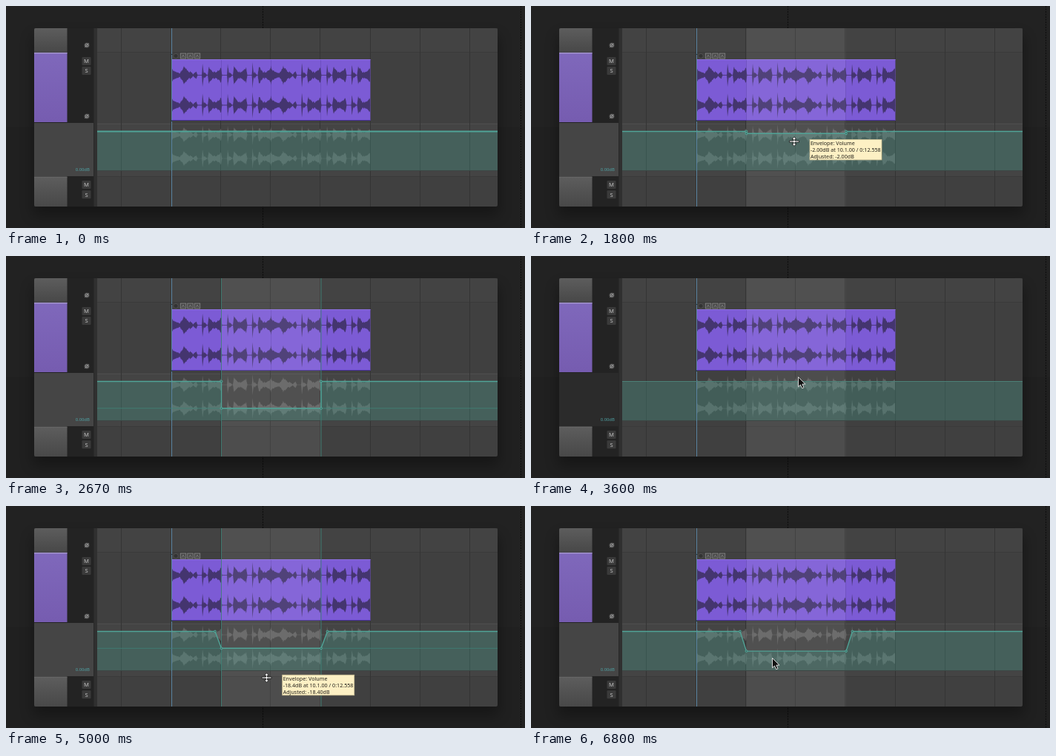
Animation of 700x300 px, one loop 6870 ms. Source, as an HTML page:

```html
<!DOCTYPE html>
<html lang="en">
<head>
<meta charset="utf-8">
<title>Volume envelope</title>
<style>
html, body { margin: 0; width: 100%; height: 100%; overflow: hidden; background: #212121; }
svg { display: block; width: 700px; height: 300px; }
text { font-family: "Noto Sans", "Open Sans", sans-serif; }
</style>
</head>
<body>
<svg viewBox="0 0 700 300" xmlns="http://www.w3.org/2000/svg">
  <defs>
    <linearGradient id="grey" x2="0" y2="1"><stop stop-color="#5d5d5d"/><stop offset="1" stop-color="#484848"/></linearGradient>
    <linearGradient id="violet" x2="0" y2="1"><stop stop-color="#7f68bb"/><stop offset="1" stop-color="#765cb0"/></linearGradient>
    <clipPath id="window"><rect x="38" y="30" width="625" height="241" rx="2"/></clipPath>
    <clipPath id="lane"><rect x="123" y="161" width="540" height="61"/></clipPath>
    <filter id="blur" x="-20%" y="-30%" width="140%" height="160%"><feGaussianBlur stdDeviation="9"/></filter>
  </defs>

  <rect width="700" height="300" fill="#202020"/>
  <rect width="700" height="163.5" fill="#222"/>
  <path d="M346.5 0V300M694.5 0V300" stroke="#0c0c0c" stroke-dasharray="2 1.5"/>
  <rect x="36" y="40" width="629" height="243" fill="#000" opacity=".3" filter="url(#blur)"/>

  <g clip-path="url(#window)">
    <rect x="38" y="30" width="625" height="241" fill="#404040"/>
    <rect x="123" y="30" width="540" height="32" fill="#434343"/>
    <g id="laneGlow">
      <rect x="123" y="158" width="540" height="72" fill="#fff" opacity=".02"/>
      <path d="M123 159.5H663" stroke="#4d4d4d"/>
    </g>
    <path d="M123 62.5H663M123 230.5H663" stroke="#3a3a3a"/>
    <path id="grid" stroke="#343434"/>

    <g id="item">
      <rect x="223" y="72" width="268.5" height="83" fill="#7c5bd5"/>
      <path d="M223 72.5H491.5" stroke="#8d70df"/>
      <path d="M223 154.5H491.5" stroke="#48309a"/>
      <path d="M290.5 73V154M357.5 73V154M424.5 73V154" stroke="#6448b5" opacity=".6"/>
      <path d="M223 93.5H491.5M223 134H491.5" stroke="#4b397f" stroke-width=".8"/>
      <path id="wave" fill="#44356f"/>
    </g>
    <g id="icons" fill="#4a4a4a" stroke="#888" stroke-width=".8">
      <circle cx="229" cy="67.5" r="3.2" fill="#333" stroke="#555"/>
    </g>
    <rect id="selection" x="290.5" y="30" height="241" fill="#fff" opacity=".065"/>

    <g clip-path="url(#lane)">
      <path id="ghost" fill="#fff" opacity=".16"/>
      <path id="fill" fill="#48a08f" opacity=".3"/>
    </g>
    <path d="M123 222.5H663" stroke="#3c4644"/>
    <path d="M223.5 30V271" stroke="#5d86a3"/>
    <path d="M222 64l3 2h-3zM222 156v-3l3 3z" fill="#27343c"/>

    <g id="guides" stroke="#3f8378">
      <path d="M290.5 30V271M425 30V271" opacity=".85"/>
      <path id="level" d="M123 0H663" opacity=".8"/>
    </g>
    <path id="line" fill="none" stroke-linejoin="round"/>
    <g id="points" fill="#3c5f59" stroke="#55b5a6" stroke-width=".9"></g>

    <rect x="38" y="30" width="85" height="241" fill="#232323"/>
    <rect x="38" y="30" width="44.5" height="32" fill="url(#grey)"/>
    <rect x="38" y="63" width="44.5" height="94" fill="url(#violet)"/>
    <path d="M38 63.5H82.5" stroke="#a99bd0" stroke-width="1.4"/>
    <rect id="lanePanel" x="38" y="158" width="80" height="72"/>
    <rect x="38" y="231" width="44.5" height="40" fill="url(#grey)"/>
    <path d="M38 231H82.5" stroke="#707070"/>
    <rect x="118" y="30" width="5" height="241" fill="#303030"/>
    <path d="M118.5 30V271" stroke="#292929"/>
    <text x="93.7" y="223.3" font-size="5.9" fill="#4fa3a5">0.00dB</text>
    <g id="controls"></g>

    <g id="tip">
      <rect x=".5" y=".5" width="97" height="27.5" fill="#fdf0c4" stroke="#c9bd94" stroke-width=".8"/>
      <g font-size="7.15" font-weight="500" fill="#25231c">
        <text x="1.4" y="7.9">Envelope: Volume</text>
        <text x="1.4" y="17"></text>
        <text x="1.4" y="26.1"></text>
      </g>
    </g>
    <path id="arrow" d="M0 0V13.2L3 10.5L5.2 15.2L7.5 14.2L5.4 9.6H9.5Z" fill="#111" stroke="#eee" stroke-width=".9"/>
    <path id="mover" d="M-6.5-1H-.9V-3H-3L0-6.3L3-3H.9V-1H6.5V1H.9V3H3L0 6.3L-3 3H-.9V1H-6.5Z" fill="#fff" stroke="#111" stroke-width=".8"/>
  </g>
</svg>
<script>
const LOOP = 6870, ZERO_Y = 169.5, DB_PER_PX = 0.317;
const NS = "http://www.w3.org/2000/svg";
const $ = id => document.getElementById(id);

function add(parent, tag, attrs, label) {
  const el = document.createElementNS(NS, tag);
  for (const k in attrs) el.setAttribute(k, attrs[k]);
  if (label) el.textContent = label;
  return parent.appendChild(el);
}
const show = (id, on) => $(id).setAttribute("visibility", on ? "visible" : "hidden");
const move = (id, x, y) => $(id).setAttribute("transform", `translate(${x} ${y})`);

// Two-beat loop: [centre, height, rise, decay] in pixels.
const HITS = [
  [0, 15, 1, 2], [1, 8, 1, 15], [17, 13, 8, 10], [16.5, 14, 1.5, 2.5], [25, 6, 3, 5], [33, 6, 5, 2],
  ...[41.5, 75.5, 109].flatMap(x => [
    [x, 18, .8, 2], [x + 2.5, 5, 1, 4], [x + 8.5, 13, 1.5, 9], [x + 16, 6, 4, 3], [x + 25, 11, 12, 1.5]
  ])
];
function loudness(x) {
  const p = x % 134;
  let a = .3;
  for (const [c, h, rise, decay] of HITS) {
    const d = p - c;
    a = Math.max(a, h * (1 - (d < 0 ? -d / rise : d / decay)));
  }
  const noise = Math.abs(Math.sin(x * 12.9898) * 43758.5453) % 1;
  return a * (.72 + .28 * noise);
}
function wave(centre, scale) {
  let top = "", bottom = "";
  for (let x = 0; x <= 267.5; x += .5) {
    const a = loudness(x) * scale, px = 223.5 + x;
    top += `L${px} ${(centre - a).toFixed(1)}`;
    bottom = `L${px} ${(centre + a).toFixed(1)}` + bottom;
  }
  return "M" + top.slice(1) + bottom + "Z";
}
$("wave").setAttribute("d", wave(93.5, 1) + wave(134, 1));
$("ghost").setAttribute("d", wave(174, .8) + wave(206, .8));
$("grid").setAttribute("d", Array.from({ length: 8 }, (_, i) => `M${155.5 + Math.round(i * 67.1)} 30V271`).join(""));

for (const x of [235.3, 244.8, 254.3]) {
  add($("icons"), "rect", { x, y: 64, width: 7.4, height: 7 });
  add($("icons"), "path", { d: `M${x + 2} 69.2l1.7-3l1.7 3` });
}
for (const [y, label] of [[74.5, "M"], [87.5, "S"], [241.5, "M"], [254.8, "S"]]) {
  add($("controls"), "rect", { x: 102.5, y: y - 5.5, width: 12, height: 11, rx: 1, fill: "#3a3a3a" });
  add($("controls"), "text", { x: 108.5, y: y + 2.8, "font-size": 7.6, "text-anchor": "middle", fill: "#c2c2c2" }, label);
}
for (const y of [53, 149]) {
  add($("controls"), "circle", { cx: 109, cy: y, r: 3.6, fill: "#484848" });
  add($("controls"), "path", {
    d: `M106.9 ${y}a2.1 2.1 0 1 0 4.2 0a2.1 2.1 0 1 0-4.2 0M106.5 ${y + 2.6}l5-5.2`,
    fill: "none", stroke: "#aaa", "stroke-width": .8
  });
}
const dots = [0, 1, 2, 3].map(() => add($("points"), "circle", { r: 1.4 }));

// Pointer keys: [time, x, y]
const PATH = [
  [700, 387, 30], [730, 387, 37], [950, 378, 115], [1180, 360, 194], [1330, 355, 180], [1500, 355, 176.7],
  [1620, 355, 176.7], [1800, 355, 183], [2130, 354, 217], [2400, 352, 252], [2600, 352, 282], [2900, 352, 282],
  [2901, 516, 46], [3130, 460, 140], [3330, 385, 208], [3450, 368, 190], [3600, 360.5, 163.5],
  [3800, 355, 174], [4050, 355, 174], [4270, 354.5, 182], [4600, 354, 206], [5000, 351.5, 232],
  [5200, 350, 242], [5350, 349, 244], [5700, 347, 242], [5870, 341, 231], [6200, 310, 226],
  [6400, 290, 220], [6530, 291, 219], [6600, 295, 218], [6800, 325.5, 205.5]
];
function pointer(t) {
  const i = PATH.findIndex(k => k[0] > t);
  if (i < 0) return PATH[PATH.length - 1].slice(1);
  if (i === 0) return PATH[0].slice(1);
  const [t0, x0, y0] = PATH[i - 1], [t1, x1, y1] = PATH[i];
  const u = (t - t0) / (t1 - t0);
  return [x0 + (x1 - x0) * u, y0 + (y1 - y0) * u];
}
const gain = (y, start) => Math.max(0, Math.round((y - start) * DB_PER_PX / .2) * .2);
const levelY = db => ZERO_Y + 1.427 * db - .0102 * db * db;

function render(t) {
  const [x, y] = pointer(t);
  const first = t >= 1550 && t < 2800, second = t >= 3900;
  const dragging = first || (second && t < 5600);
  const dipped = first || second;
  const idle = t >= 2800 && t < 3750;
  const db = first ? gain(y, 176.7) : second ? gain(t < 5350 ? y : 244, 174) : 0;
  const dipY = levelY(db), slope = second ? 8.5 : 0;

  $("selection").setAttribute("width", t < 200 ? 0 : t < 470 ? 67 : 134);
  $("lanePanel").setAttribute("fill", idle ? "#2b2b2b" : "#454545");
  show("laneGlow", !idle);

  const corners = [[290.5 - slope, ZERO_Y], [290.5, dipY], [425, dipY], [425 + slope, ZERO_Y]];
  const line = `M123 ${ZERO_Y}` + (dipped ? corners.map(c => "L" + c).join("") : "") + `L663 ${ZERO_Y}`;
  $("fill").setAttribute("d", line + "V222H123Z");
  $("line").setAttribute("d", line);
  $("line").setAttribute("stroke", idle ? "#4c8077" : "#50a497");
  $("line").setAttribute("stroke-width", idle ? 1 : t < 1470 ? 1.9 : 1.4);
  show("points", dipped);
  dots.forEach((dot, i) => {
    dot.setAttribute("cx", corners[i][0]);
    dot.setAttribute("cy", corners[i][1]);
  });

  show("guides", dragging && t >= 1930);
  $("level").setAttribute("transform", `translate(0 ${dipY})`);

  show("tip", dragging);
  const [tipX, tipY] = pointer(t - 40);
  move("tip", tipX + 20.5, tipY - 1.7);
  const lines = $("tip").querySelectorAll("text");
  const sign = db > 0 ? "-" : "";
  lines[1].textContent = `${sign}${db.toFixed(db < 10 ? 2 : 1)}dB at 10.1.00 / 0:12.558`;
  lines[2].textContent = `Adjusted: ${sign}${db.toFixed(2)}dB`;

  const mover = (t >= 1300 && t < 2800) || (t >= 3700 && t < 5840);
  const visible = t >= 730 && !(t >= 2800 && t < 2920);
  show("arrow", visible && !mover);
  show("mover", visible && mover);
  move("arrow", x, y);
  move("mover", x, y);
}

const begin = performance.now();
function tick() {
  render((performance.now() - begin) % LOOP);
  requestAnimationFrame(tick);
}
render(0);
requestAnimationFrame(tick);
</script>
</body>
</html>
```
